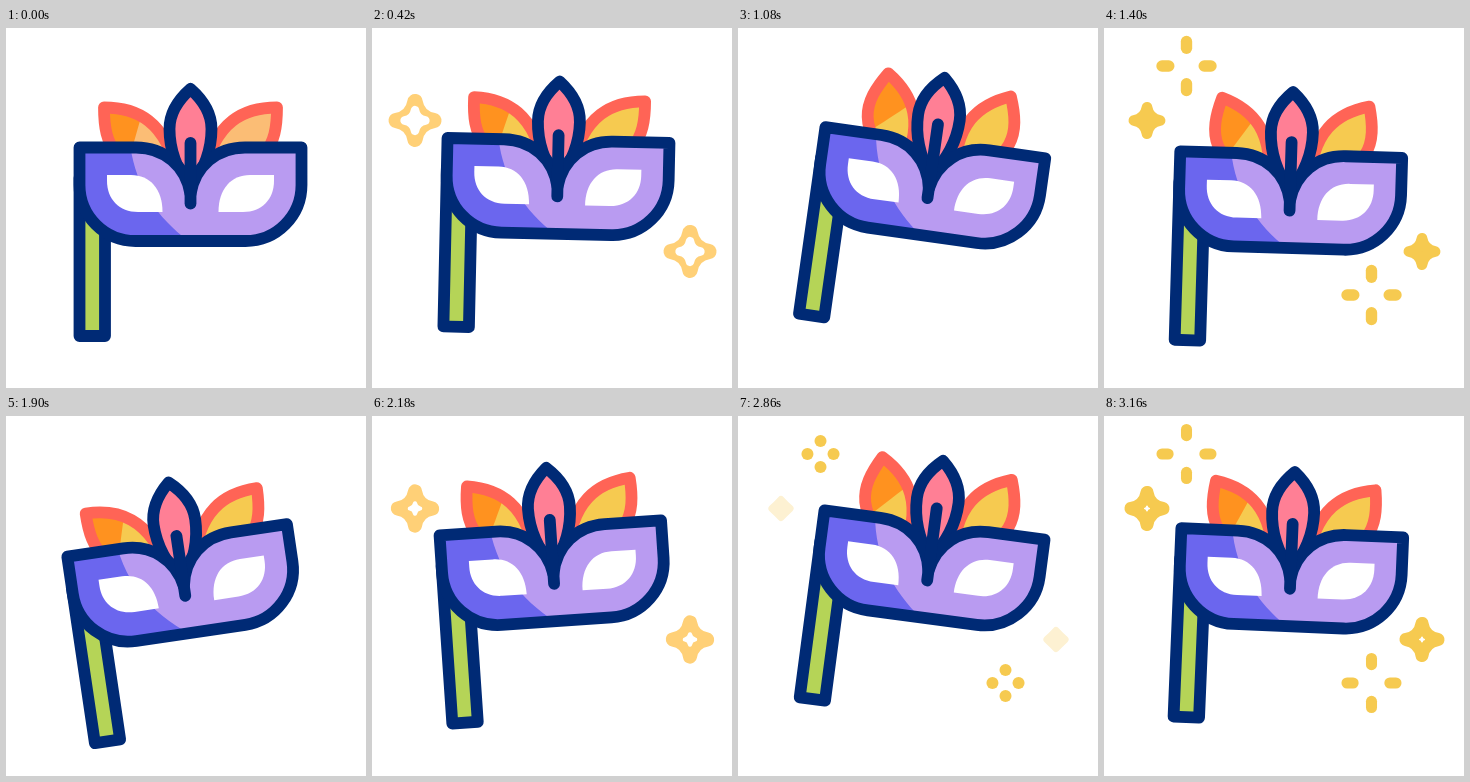
An HTML page with a canvas that plays this animation: 360 by 360 pixels, repeating every 3180 ms.

```html
<!DOCTYPE html>
<html lang="en">
<head>
<meta charset="utf-8">
<title>Carnival mask</title>
<style>
  html, body { margin: 0; width: 100%; height: 100%; overflow: hidden; background: #fff; }
  canvas { display: block; width: 360px; height: 360px; }
</style>
</head>
<body>
<canvas id="stage"></canvas>
<script>
const LOOP = 3180;
const NAVY = '#002a75', CORAL = '#ff6456', ORANGE = '#ff921f', YELLOW = '#f6ca50';
const PINK = '#ff7f95', VIOLET = '#6b66ee', LILAC = '#b99bf1', GREEN = '#b5d457';
const PALE_GOLD = '#ffd077';

const canvas = document.getElementById('stage');
const ctx = canvas.getContext('2d');
const density = window.devicePixelRatio || 1;
canvas.width = canvas.height = Math.round(360 * density);

const sine = u => (1 - Math.cos(Math.PI * u)) / 2;
const linear = u => u;

// Interpolates a list of [time, value] keys.
function track(keys, t, ease = sine) {
  if (t <= keys[0][0]) return keys[0][1];
  for (let k = 1; k < keys.length; k++) {
    const [t0, v0] = keys[k - 1], [t1, v1] = keys[k];
    if (t <= t1) return v0 + (v1 - v0) * ease((t - t0) / (t1 - t0));
  }
  return keys[keys.length - 1][1];
}

const TILT = [[200, 0], [1060, 8.1], [1860, -8.5], [2765, 8], [3390, 0]];
const RISE = [[200, 0], [680, -16.2], [1600, 10], [2545, -16.3], [3390, 0]];
const SPREAD = [[315, 0], [1055, 1], [1820, 0], [1930, 0], [2690, 1], [3450, 0]];

const STAR_SIZE = [[100, 10], [160, 12.5], [250, 17], [350, 18], [460, 22.5], [600, 26.5]];
const STAR_WAIST = [[170, 0.34], [250, 0.1]];
const STAR_ALPHA = [[110, 0], [160, 0.25], [240, 1]];
const RAY_OUTER = [[90, 0], [160, 13], [200, 16], [245, 23], [330, 24.5]];
const RAY_INNER = [[90, 0], [160, 13], [330, 17.5], [480, 18.5], [740, 24.5]];
const RAY_WIDTH = [[90, 0], [160, 12], [480, 11], [740, 0]];
const TWINKLES = [1040, 2700];

const body = new Path2D('M73.5 119.5H130C158 119.5 180 138 184.5 166C189 138 211 119.5 239 119.5' +
  'H295.5V157A56 56 0 0 1 239.5 213H129.5A56 56 0 0 1 73.5 157Z');
const shade = new Path2D('M60 100H123C124 150 147 187 184 214H60Z');
const eye = new Path2D('M101 147H125C144 147 156.5 161 156.5 184H132C113 184 101 171 101 153Z');
const stick = new Path2D('M73.5 150H99V308H73.5Z');
const plume = new Path2D('M184.5 61C172 72 163.5 84 163.5 101C163.5 124 171 142 184.5 160' +
  'C198 142 205.5 124 205.5 101C205.5 84 197 72 184.5 61Z');
const sidePlume = new Path2D('M98 79.5C130 79.5 160 92 172 148C108 142 98 118 98 79.5Z');
const plumeGlow = new Path2D('M138 80C132 98 129 112 122 134L180 160V80Z');

function outline(path, color, fill) {
  if (fill) { ctx.fillStyle = fill; ctx.fill(path); }
  ctx.strokeStyle = color;
  ctx.lineWidth = 11.8;
  ctx.stroke(path);
}

function clipped(path, inner, color) {
  ctx.save();
  ctx.clip(path);
  ctx.fillStyle = color;
  ctx.fill(inner);
  ctx.restore();
}

function mirror() {
  ctx.translate(369, 0);
  ctx.scale(-1, 1);
}

function drawSidePlume(angle, flipped, glow) {
  ctx.save();
  if (flipped) mirror();
  ctx.translate(150.5, 119.5);
  ctx.rotate(angle * Math.PI / 180);
  ctx.translate(-150.5, -119.5);
  ctx.fillStyle = flipped ? glow : ORANGE;
  ctx.fill(sidePlume);
  if (!flipped) clipped(sidePlume, plumeGlow, glow);
  outline(sidePlume, CORAL);
  ctx.restore();
}

function drawMask(t) {
  const spread = track(SPREAD, t);
  const glow = t < 20 ? '#fbbd75' : YELLOW;
  ctx.save();
  ctx.translate(184.5, 211 + track(RISE, t));
  ctx.rotate(track(TILT, t) * Math.PI / 180);
  ctx.translate(-184.5, -211);

  drawSidePlume(33 * spread, false, glow);
  drawSidePlume(21.5 * spread, true, glow);

  ctx.save();
  ctx.translate(0, -7 * spread);
  outline(plume, NAVY, PINK);
  ctx.restore();

  outline(stick, NAVY, GREEN);
  ctx.fillStyle = LILAC;
  ctx.fill(body);
  clipped(body, shade, VIOLET);
  outline(body, NAVY);

  ctx.fillStyle = '#fff';
  ctx.fill(eye);
  ctx.save();
  mirror();
  ctx.fill(eye);
  ctx.restore();

  const stem = new Path2D();
  stem.moveTo(184.5, 115 - 14 * spread);
  stem.lineTo(184.5, 175.5);
  outline(stem, NAVY);
  ctx.restore();
}

function starShape(size, waistRatio) {
  const tip = size * 0.71, waist = size * waistRatio;
  ctx.beginPath();
  ctx.moveTo(0, -tip);
  ctx.quadraticCurveTo(waist, -waist, tip, 0);
  ctx.quadraticCurveTo(waist, waist, 0, tip);
  ctx.quadraticCurveTo(-waist, waist, -tip, 0);
  ctx.quadraticCurveTo(-waist, -waist, 0, -tip);
  ctx.closePath();
  ctx.lineWidth = size * 0.58;
  ctx.fill();
  ctx.stroke();
}

// Mixes a hex colour with the white background.
function fade(color, alpha) {
  const channels = [1, 3, 5].map(k => parseInt(color.slice(k, k + 2), 16));
  return `rgb(${channels.map(c => Math.round(255 + (c - 255) * alpha))})`;
}

function drawStar(x, y, age) {
  const d = Math.abs(age);
  if (d < 110 || d > 780) return;
  const waist = track(STAR_WAIST, d, linear);
  const color = age < 0 ? PALE_GOLD : YELLOW;
  ctx.save();
  ctx.translate(x, y);
  ctx.fillStyle = ctx.strokeStyle = fade(color, track(STAR_ALPHA, d, linear));
  starShape(track(STAR_SIZE, d, linear), waist);
  const hole = 26.5 * (d - 420) / 360;
  if (hole > 0) {
    ctx.fillStyle = ctx.strokeStyle = '#fff';
    starShape(hole, waist);
  }
  ctx.restore();
}

function drawRays(x, y, age) {
  if (age <= 90 || age >= 740) return;
  const inner = track(RAY_INNER, age, linear);
  const outer = Math.max(inner + 0.01, track(RAY_OUTER, age, linear));
  ctx.save();
  ctx.translate(x, y);
  ctx.strokeStyle = YELLOW;
  ctx.lineWidth = track(RAY_WIDTH, age, linear);
  for (let k = 0; k < 4; k++) {
    ctx.beginPath();
    ctx.moveTo(0, inner);
    ctx.lineTo(0, outer);
    ctx.stroke();
    ctx.rotate(Math.PI / 2);
  }
  ctx.restore();
}

function draw(t) {
  ctx.setTransform(density, 0, 0, density, 0, 0);
  ctx.fillStyle = '#fff';
  ctx.fillRect(0, 0, 360, 360);
  ctx.lineCap = ctx.lineJoin = 'round';
  for (const center of TWINKLES) {
    const age = t - center;
    drawStar(43, 92.5, age);
    drawStar(318, 223.5, age);
    drawRays(82.5, 38, age);
    drawRays(267.5, 267, age);
  }
  drawMask(t);
}

const start = performance.now();
function tick() {
  draw((performance.now() - start) % LOOP);
  requestAnimationFrame(tick);
}
tick();
</script>
</body>
</html>
```
